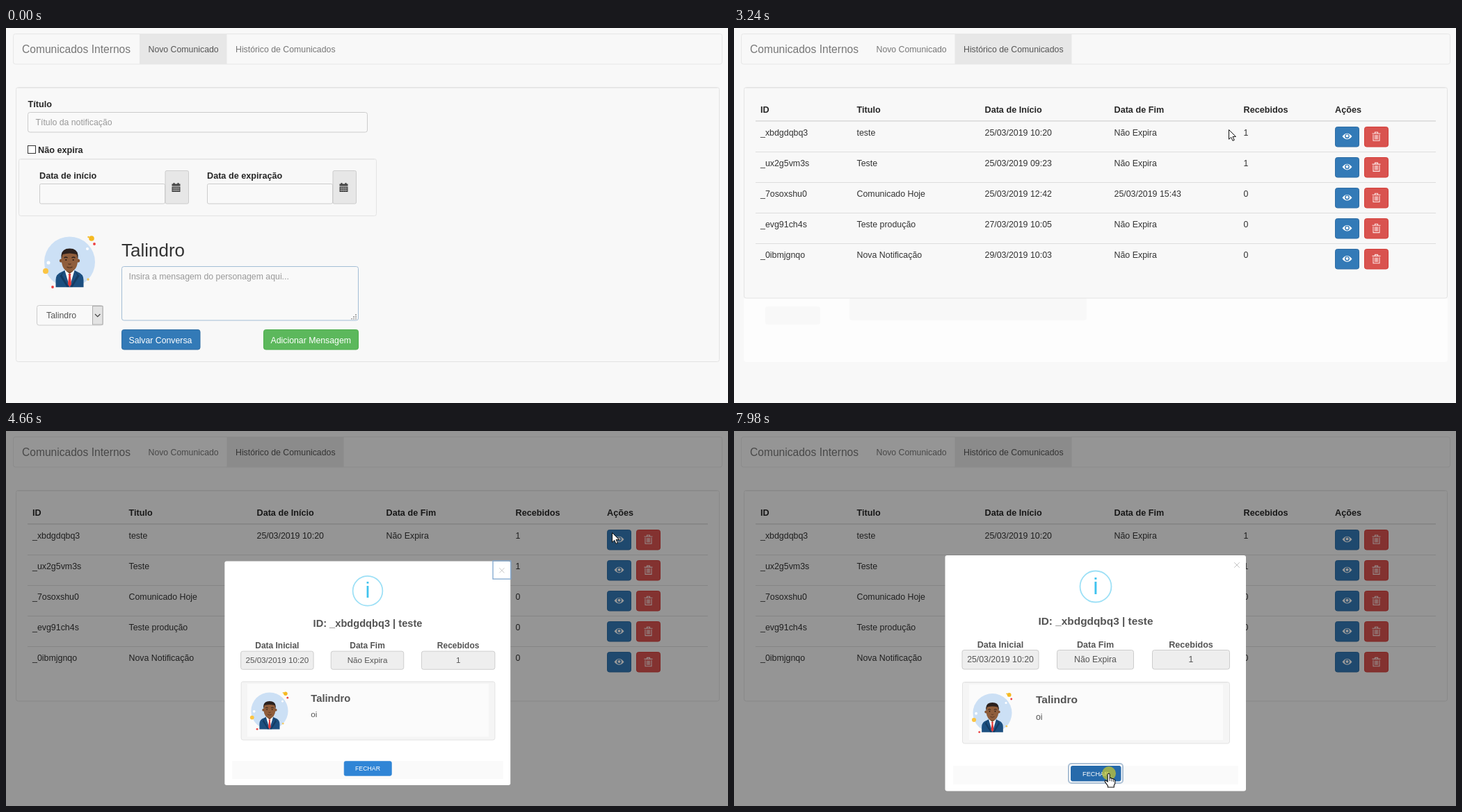
An HTML page for the animation above (8000 ms loop, 1038x540 px).

```html
<!DOCTYPE html>
<html lang="pt">
<head>
<meta charset="utf-8">
<title>Comunicados Internos</title>
<style>
html, body { margin: 0; width: 100%; height: 100%; overflow: hidden; background: #f8f8f8; }
svg { display: block; font-family: "Liberation Sans", Arial, sans-serif; white-space: pre; }
</style>
</head>
<body>
<svg id="stage" width="1038" height="540" viewBox="0 0 1038 540"></svg>
<script>
const LOOP = 8000;
const PERSON = 'Talindro';

// Drawing helpers: each returns SVG markup
const text = (s, x, y, { size = 12.3, fill = '#333', bold, mid } = {}) =>
  `<text x="${x}" y="${y}" font-size="${size}"${fill ? ` fill="${fill}"` : ''}${bold ? ' font-weight="bold"' : ''}${mid ? ' text-anchor="middle"' : ''}>${s}</text>`;
const label = (s, x, y, mid) => text(s, x, y, { size: 12.65, fill: '#262626', bold: true, mid });
const box = (x, y, w, h, fill = 'none', stroke = fill, r = 3, extra = '') =>
  `<rect x="${x + .5}" y="${y + .5}" width="${w - 1}" height="${h - 1}" rx="${r}" fill="${fill}" stroke="${stroke}" ${extra}/>`;
const dot = (x, y, r, fill) => `<circle cx="${x}" cy="${y}" r="${r}" fill="${fill}"/>`;
const path = (d, fill, stroke = 'none', width = 1) =>
  `<path d="${d}" fill="${fill}" stroke="${stroke}" stroke-width="${width}"/>`;
const group = (s, attrs = '') => `<g ${attrs}>${s}</g>`;
const at = (x, y, s, scale = 1) => group(s, `transform="translate(${x} ${y}) scale(${scale})"`);
const well = (x, y, w, h, fill = '#f8f8f8') =>
  box(x, y, w, h, fill, '#e3e3e3') + path(`M${x + 3} ${y + 1.5}h${w - 6}`, 'none', '#ececec');

const avatar = dot(0, 0, 36.5, '#cce0f5')
  + dot(31.5, -34, 3.8, '#f5b921') + dot(27, -36, 1.2, '#f5b921') + dot(35.5, -26, 1.9, '#ee4040')
  + dot(25.5, -19, 2, '#fff') + dot(-30.5, 1, 2.5, '#fff') + dot(-34.5, 13, 4, '#fbc543')
  + dot(-24.5, 36, 1.9, '#ee4040') + dot(26.5, 25, 1.7, '#f5c95a')
  + path('M-20 36.2V26Q-20 17 -11 14L-5 11H5L11 14Q20 17 20 26V36.2Z', '#1c4f80')
  + path('M-7 12L0 36L7 12Z', '#fff') + path('M-5 7H5V13L0 17L-5 13Z', '#734629')
  + path('M-2 17H2L1.3 20L2.6 32L0 36L-2.6 32L-1.3 20Z', '#e23b3b')
  + path('M-7 12L-11 19L-1 36H-4L-14 20Z M7 12L11 19L1 36H4L14 20Z', '#143b62')
  + dot(-12, -2, 2.6, '#81502f') + dot(12, -2, 2.6, '#81502f')
  + path('M-11.5 -9Q-11 -17 0 -17T11.5 -9V0Q10 13 0 14Q-10 13 -11.5 0Z', '#8f5d3b')
  + path('M-12 -4V-10Q-11 -19.5 0 -19.5T12 -10V-4L10 -11Q0 -14 -10 -11Z', '#2b201d')
  + path('M-8 -6Q-5.5 -8 -3 -6M3 -6Q5.5 -8 8 -6', 'none', '#2b201d', 1.3)
  + dot(-5.2, -3, 1.1, '#211815') + dot(5.2, -3, 1.1, '#211815')
  + path('M-2 2.5Q0 4 2 2.5M-4 7Q0 9.5 4 7', 'none', '#50301f', 1.1);

const calendar = path('M-6 -5H6V-2H-6Z M-6 -1H6V6.5H-6Z M-4 -6.5h2v2h-2z M2 -6.5h2v2h-2z', '#444')
  + path('M-5 1.3H5M-5 4H5', 'none', '#ddd', .8) + path('M-2.7 -.5V6M0 -.5V6M2.7 -.5V6', 'none', '#999', .6);
const eye = path('M-7 0Q0 -8.6 7 0Q0 8.6 -7 0Z', '#fff') + dot(0, -.2, 3.4, '#337ab7') + dot(0, -.4, 2, '#fff');
const trash = path('M-6 -4.5H6M-2 -5V-6.5H2V-5M-4.5 -3V5.8H4.5V-3M-1.8 -2.5V4M0 -2.5V4M1.8 -2.5V4', 'none', '#fbe3e2', 1.1);

function nav() {
  return box(10, 8, 1020, 44.5, '#f8f8f8', '#e7e7e7')
    + '<rect id="tab" y="9" height="43" fill="#e7e7e7"/>'
    + text('Comunicados Internos', 23, 35.5, { size: 15.6, fill: '#777' })
    + group(text('Novo Comunicado', 204.5, 34.5, { fill: '' }), 'id="novo"')
    + group(text('Histórico de Comunicados', 330, 34.5, { fill: '' }), 'id="historico"');
}

function dateField(x, name) {
  return label(name, x, 216.5) + box(x, 224, 181, 29.5, '#f9f9f9', '#ccc', 2)
    + box(x + 180.5, 205, 34.5, 48.5, '#e7e7e7', '#ccc', 2) + at(x + 196.5, 229.5, calendar);
}

function form() {
  const white = { fill: '#fff' }, hint = { fill: '#999' };
  return well(14, 85, 1012, 396)
    + label('Título', 31.5, 114) + box(31, 121, 489, 29.5, '#f9f9f9', '#ccc') + text('Título da notificação', 42.5, 140, hint)
    + box(31, 169, 12, 12, '#fff', '#333', 0) + label('Não expira', 46, 180)
    + well(18, 188, 515, 83) + dateField(48, 'Data de início') + dateField(289, 'Data de expiração')
    + at(91.5, 337, avatar) + text(PERSON, 166, 328.5, { size: 26 })
    + box(44, 399, 96, 29.5, '#f9f9f9', '#ccc') + text(PERSON, 58, 418, { fill: '#555' })
    + box(124, 400, 15.5, 27.5, '#e3e3e3', '#adadad', 0) + path('M128 412l3.7 3.7l3.7 -3.7', 'none', '#444', 1.2)
    + box(166, 343, 341, 78.5, '#f9f9f9', '#ccc', 3, 'id="message"')
    + text('Insira a mensagem do personagem aqui...', 176.5, 362, hint)
    + path('M502 412h2v2h-2z M499 415h2v2h-2z M502 415h2v2h-2z M496 418h2v1.5h-2z M499 418h2v1.5h-2z M502 418h2v1.5h-2z', '#aaa')
    + box(166, 434, 113.5, 29.5, '#337ab7', '#2e6da4') + text('Salvar Conversa', 176.5, 454, white)
    + box(370, 434, 137, 29.5, '#5cb85c', '#4cae4c') + text('Adicionar Mensagem', 380.5, 454, white);
}

function table() {
  const columns = [38, 176.5, 360.5, 546.5, 732.5, 864];
  const rows = [
    ['_xbdgdqbq3', 'teste', '25/03/2019 10:20', 'Não Expira', '1'],
    ['_ux2g5vm3s', 'Teste', '25/03/2019 09:23', 'Não Expira', '1'],
    ['_7osoxshu0', 'Comunicado Hoje', '25/03/2019 12:42', '25/03/2019 15:43', '0'],
    ['_evg91ch4s', 'Teste produção', '27/03/2019 10:05', 'Não Expira', '0'],
    ['_0ibmjgnqo', 'Nova Notificação', '29/03/2019 10:03', 'Não Expira', '0']];
  let s = group(box(14, 388, 1012, 93, '#fdfdfd') + box(166, 388, 341, 33, '#f8f8f8') + box(45, 401, 79, 26, '#f8f8f8'), 'id="residue"')
    + well(14, 85, 1012, 304.5)
    + ['ID', 'Titulo', 'Data de Início', 'Data de Fim', 'Recebidos', 'Ações'].map((h, i) => label(h, columns[i], 122)).join('')
    + path('M31 133.8H1009', 'none', '#ddd', 1.7);
  rows.forEach((row, i) => {
    const y = i * 44.1;
    if (i) s += path(`M31 ${Math.round(y + 134) + .5}H1009`, 'none', '#ddd');
    s += row.map((cell, j) => text(cell, columns[j], 155 + y, { size: 12.4 })).join('')
      + box(864, Math.round(142 + y), 35, 29.5, '#337ab7', '#2e6da4', 3, i ? '' : 'id="view"') + at(881.5, 156 + y, eye)
      + box(906, Math.round(142 + y), 35, 29.5, '#d9534f', '#d43f3a') + at(923.5, 156.5 + y, trash);
  });
  return s;
}

function modal() {
  const field = (x, w, name, value) => text(name, x + w / 2, 311.5, { size: 12.6, fill: '#545454', bold: true, mid: true })
    + box(x, 315, w, 28.5, '#eee', '#ccc') + text(value, x + w / 2, 333.3, { fill: '#555', mid: true });
  return '<rect x="303.5" y="179" width="432.5" height="339.5" rx="3" fill="#fff"/><rect x="315" y="482" width="410" height="27" fill="#fafafa"/>'
    + '<circle cx="520" cy="224" r="22.5" fill="none" stroke="#9de0f6" stroke-width="1.8"/>'
    + text('i', 520, 234.5, { size: 33, fill: '#3fc3ee', mid: true })
    + path('M719.2 189.2l7.6 7.6m0 -7.6l-7.6 7.6', 'none', '#c4c4c4')
    + box(709, 178, 28, 28.5, 'none', '#82a8d0', 0, 'id="closeFocus" stroke-width="1.4"')
    + text('ID: _xbdgdqbq3 | teste', 520, 278.5, { size: 15.4, fill: '#545454', bold: true, mid: true })
    + field(327.5, 111, 'Data Inicial', '25/03/2019 10:20') + field(464, 111, 'Data Fim', 'Não Expira') + field(601, 112, 'Recebidos', '1')
    + well(328, 361, 385, 89.5, '#f5f5f5') + box(338, 365, 365, 80, '#fbfbfb', '#fbfbfb', 0)
    + at(371.5, 406, avatar, .767)
    + text(PERSON, 434, 392, { size: 15.5, fill: '#545454', bold: true }) + text('oi', 434, 415.5, { fill: '#545454' })
    + box(480.5, 478.5, 79, 29, '#fff', '#adc1d5', 4, 'id="okFocus" stroke-width="2"')
    + box(484, 482, 72.5, 22.5, '#3085d6', undefined, 2, 'id="ok"')
    + text('FECHAR', 520, 496.7, { size: 9.2, fill: '#fff', mid: true });
}

const arrow = path('M.5 .5V14.2L3.7 11.2L6 16.3L8.3 15.3L6 10.4H10.4Z', '#fff', '#111', 1);
const hand = path('M-1.8 12V1.7Q-1.8 .3 -.3 .3T1.2 1.7V7Q3.6 5.8 4 7.8Q6 6.8 6.5 8.7Q8.7 8.2 8.8 10.5V14.5L7.3 17.5V20H-1.5V18L-5.5 12.4Q-6.5 10 -4.3 10.2Z', '#fff', '#111', 1.1)
  + path('M1.2 7.5V11M4 8.5V11.5M6.5 9.5V12', 'none', '#111', .9);

const $ = id => document.getElementById(id);
$('stage').innerHTML = nav() + group(form(), 'id="formPage"') + group(table(), 'id="tablePage"')
  + '<rect id="shade" width="1038" height="540"/>' + group(modal(), 'id="dialog"')
  + group('<circle id="click" r="10" fill="#d2cd28" fill-opacity=".68"/>' + group(arrow, 'id="arrow"') + group(hand, 'id="hand"'), 'id="cursor"');

// Pointer moves: first and last step time, number of steps, points at even time intervals
const moves = [
  [1080, 1850, 11, [[661, 504], [661, 504], [560, 450], [430, 370], [310, 290], [236, 246], [228, 215], [233, 172], [246, 122], [272, 87], [288, 53], [331, 30]]],
  [1930, 1930, 1, [[331, 30], [339, 26]]],
  [2770, 3550, 11, [[339, 26], [343, 37], [367, 61], [430, 92], [505, 117], [580, 133], [652, 142], [711, 146], [760, 148], [800, 148], [833, 148], [855, 148]]],
  [3630, 3930, 5, [[855, 148], [871, 146]]],
  [5360, 6130, 11, [[871, 146], [868, 158], [860, 178], [845, 200], [818, 236], [783, 271], [738, 297], [692, 314], [645, 324], [605, 327], [572, 327], [549, 327]]],
  [6220, 6980, 11, [[549, 327], [542, 370], [525, 402], [499, 402], [460, 375], [440, 347], [450, 308], [484, 329]]],
  [7130, 7900, 11, [[484, 329], [545, 345], [609, 392], [626, 415], [601, 426], [585, 462], [560, 487], [539, 493]]]];

function pointer(t) {
  const [start, end, steps, points] = moves.filter(m => t >= m[0]).pop() || moves[0];
  const interval = (end - start) / (steps - 1) || 1;
  const done = Math.floor((t - start) / interval + .15) + 1;
  const u = Math.max(0, Math.min(done / steps, 1)) * (points.length - 1);
  const i = Math.min(Math.floor(u), points.length - 2);
  return points[i].map((v, k) => Math.round(v + (points[i + 1][k] - v) * (u - i)));
}

const set = (id, name, value) => $(id).setAttribute(name, value);
const show = (id, on) => set(id, 'display', on ? 'inline' : 'none');

function draw(t) {
  const between = (a, b) => t >= a && t < b;
  const history = t >= 2390, open = t >= 4490, focused = t >= 7980;
  const [x, y] = pointer(t);

  show('formPage', !history);
  show('tablePage', history);
  set('tab', 'x', history ? 317.5 : 192);
  set('tab', 'width', history ? 168 : 125.5);
  set('novo', 'fill', history ? '#777' : '#555');
  set('historico', 'fill', history ? '#555' : t >= 1850 ? '#333' : '#777');
  set('message', 'stroke', t < 70 ? '#a3bed6' : '#ccc');

  const hover = between(3630, 4330) && x >= 864, active = between(4330, 4490);
  set('view', 'fill', active ? '#204d74' : hover ? '#286090' : '#337ab7');
  set('view', 'stroke', active ? '#122b40' : hover ? '#204d74' : '#2e6da4');
  show('residue', !open);

  show('shade', open);
  set('shade', 'fill-opacity', t < 4570 ? .35 : .4);
  show('dialog', open);
  const scale = t < 4570 ? .949 : t < 4650 ? 1.05 : t < 4740 ? .95 : 1;
  set('dialog', 'transform', `translate(520 348.5) scale(${scale}) translate(-520 -348.5)`);
  show('closeFocus', !focused);
  show('okFocus', focused);
  const okFill = focused ? '#266aab' : t >= 7900 ? '#2b78c1' : '#3085d6';
  set('ok', 'fill', okFill);
  set('ok', 'stroke', okFill);

  const pointing = between(1930, 2845) || t >= 7890;
  show('cursor', t >= 1080);
  set('cursor', 'transform', `translate(${x} ${y})`);
  show('hand', pointing);
  show('arrow', !pointing);
  show('click', between(2160, 2240) || between(4330, 4400) || focused);
}

function frame() {
  draw(performance.now() % LOOP);
  requestAnimationFrame(frame);
}
frame();
</script>
</body>
</html>
```
